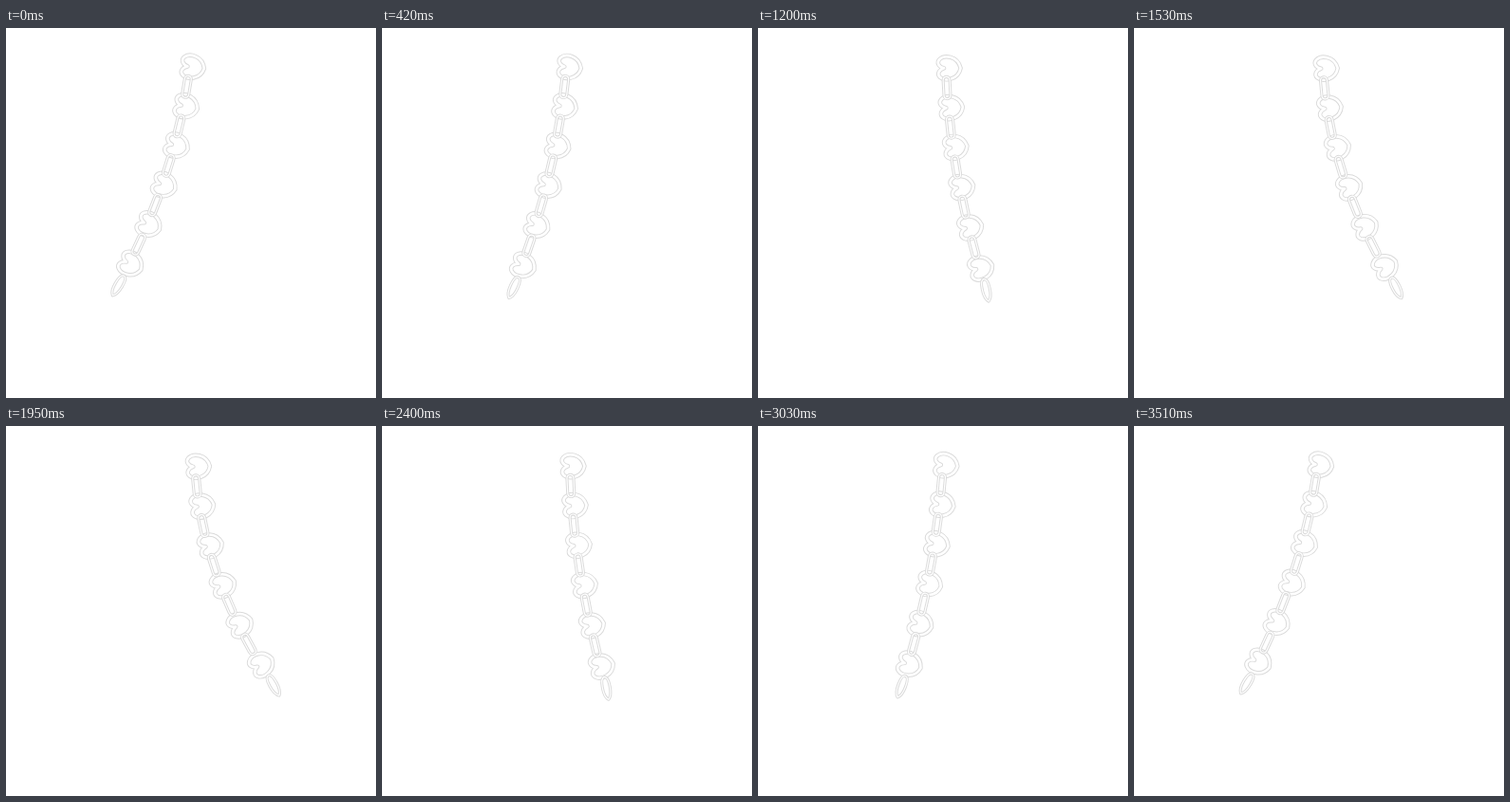
Animation, 390 px wide and 390 px high, one loop 3.54 s. Source, as an HTML page with a canvas:

```html
<!DOCTYPE html>
<html lang="en">
<head>
<meta charset="utf-8">
<title>Swinging heart chain</title>
<style>
  html, body { margin: 0; width: 100%; height: 100%; overflow: hidden; background: #fff; }
  canvas { display: block; }
</style>
</head>
<body>
<canvas id="stage" width="390" height="390"></canvas>
<script>
const ctx = document.getElementById('stage').getContext('2d');
const LOOP = 3540, STEP = 30, RIGHTMOST = 1785;
const LAST = 11, SPACING = 20.8;

const heart = new Path2D(
  'M-5.5 0C-11 -1.5 -13.5 -6 -10 -9.5C-5 -14 9 -13 12 .5C9 13 -5 14 -10 9.5C-13.5 6 -11 1.5 -5.5 0Z');
const link = new Path2D('M-3.5 -7.5C-3.5 -13 3.5 -13 3.5 -7.5V7.5C3.5 13 -3.5 13 -3.5 7.5Z');
const endLink = new Path2D('M0 -10C3 -10 4 -5 4 1C4 7 2.5 12 0 14C-2.5 12 -4 7 -4 1C-4 -5 -3 -10 0 -10Z');

const isLink = i => i % 2 === 1;

// Sideways position of the free end, from -1 (left) to 1 (right)
function swing(t) {
  const a = 2 * Math.PI * (t - RIGHTMOST) / LOOP;
  const c = Math.cos(a);
  return c - 0.05 * Math.sin(a) ** 2 * (1 + c);
}

// The reach grows towards the free end; pieces bow out as the chain passes the middle
function place(i, u) {
  const w = i / LAST, bow = 1 - u * u;
  const rest = 200 - 9.5 * w + 13.5 * w * w - (isLink(i) ? 3.6 - 2 * w : 0);
  const reach = 3 + 20 * w + 60 * w * w;
  return {
    x: rest + reach * u + (0.3 + 9 * w * (1 - w)) * bow,
    y: 41.8 + SPACING * i + 0.8 * u + 4.3 * w ** 3 * bow
  };
}

function tilt(i, u) {
  if (i === 0) return tilt(1, u) * 0.6;
  const from = place(i - 1, u), to = place(Math.min(i + 1, LAST), u);
  return Math.atan2(from.x - to.x, to.y - from.y);
}

function tube(path, i, u, width) {
  const { x, y } = place(i, u);
  ctx.save();
  ctx.translate(x, y);
  ctx.rotate(tilt(i, u));
  ctx.strokeStyle = '#dadada';
  ctx.lineWidth = width;
  ctx.stroke(path);
  ctx.strokeStyle = '#fff';
  ctx.lineWidth = width - 1.9;
  ctx.stroke(path);
  ctx.restore();
}

function draw(t) {
  const u = swing(t);
  ctx.fillStyle = '#fff';
  ctx.fillRect(0, 0, 390, 390);
  for (let i = 0; i < LAST; i += 2) tube(heart, i, u, 4.5);
  for (let i = 1; i <= LAST; i += 2) tube(i === LAST ? endLink : link, i, u, 3.1);
}

ctx.lineJoin = 'round';
const start = performance.now();
function frame(now) {
  const t = Math.max(0, now - start) % LOOP;
  draw(Math.floor(t / STEP) * STEP);
  requestAnimationFrame(frame);
}
draw(0);
requestAnimationFrame(frame);
</script>
</body>
</html>
```
